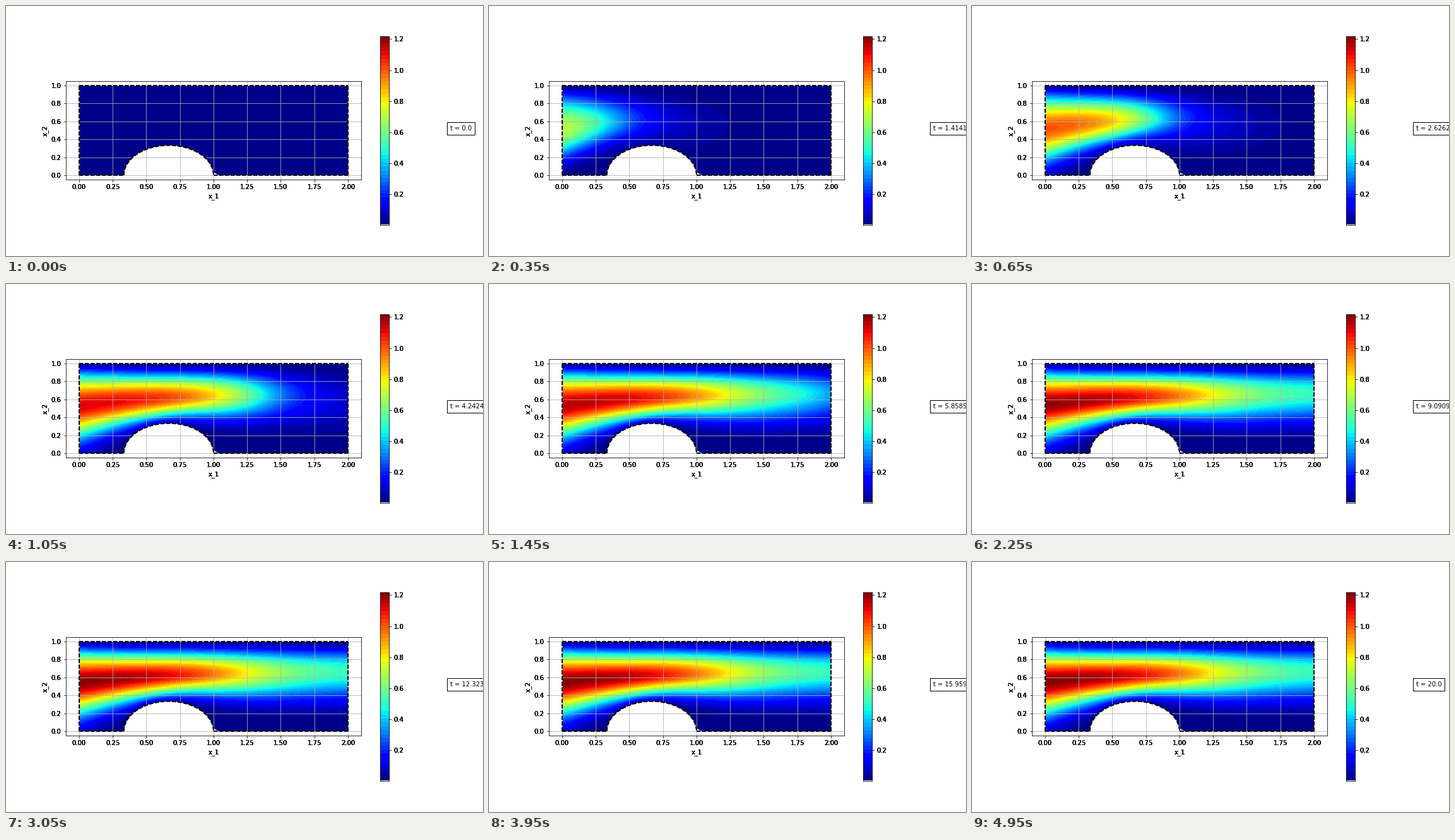
These frames come from a looping animation (756x396 px, 5000 ms). A matplotlib script:

```python
import numpy as np
import matplotlib.pyplot as plt
from matplotlib.animation import FuncAnimation
from matplotlib.patches import Polygon

FRAMES, T_END = 100, 20.0
R, CX = 1 / 3, 2 / 3              # hump radius and centre
V_MIN, V_MAX, BANDS = 0.002, 1.22, 49

plt.rcParams.update({"font.family": "DejaVu Sans", "font.size": 10})
fig = plt.figure(figsize=(10.5, 5.5), dpi=72, facecolor="white")
width = 0.62
height = width * 10.5 / 5.5 / 3
ax = fig.add_axes([0.125, 0.5025 - height / 2, width, height])
cax = fig.add_axes([0.78375, 0.125, 0.755 * 5.5 / 20 / 10.5, 0.755])

colors = plt.get_cmap("jet")((np.arange(BANDS) + 0.5) / BANDS)
x, y = np.meshgrid((np.arange(852) + 0.5) / 426, (np.arange(284) + 0.5) / 284)


def step(u):
    return 1 / (1 + np.exp(np.clip(u, -50, 50)))


# Parts of the plume that do not depend on time
core = 0.475 + 0.75 * step((x - 1.17) / 0.28)
axis_y = 0.545 + 0.14 * (1 - np.exp(-x))
low_w = (0.18 + 0.16 * np.exp(-(x / 0.4) ** 1.3)
         + 0.11 * (1 - np.exp(-(np.maximum(x - 0.65, 0) / 0.6) ** 2)))
high_w = 0.25 + 0.1 * np.exp(-x / 0.4)
gap = np.maximum(np.hypot(x - CX, y) - R, 0)
walls = np.tanh((1 - y) / 0.11) * np.tanh((gap + 0.02) / 0.06)
haze = 0.1 * np.exp(-((y - 0.55) / 0.3) ** 2) * np.tanh((1 - y) / 0.05)
near_inlet = np.exp(-x / 0.3)


def field(t):
    """Concentration: a plume behind a front that travels to the right."""
    growth = 1 - np.exp(-(t / 1.186) ** 0.75)
    early = np.exp(-t / 3.5) * near_inlet
    d = y - axis_y + 0.08 * early
    w = np.where(d < 0, low_w, high_w + 0.08 * early)
    plume = growth * core * np.exp(-(d / w) ** 2) * walls
    front = 0.395 * t - 0.22
    behind = step((x - front + 1.2 * (y - 0.68) ** 2) / 0.17)
    ahead = haze * (1 - np.exp(-t)) * step((x - front - 0.75) / 0.2)
    return plume * behind + ahead * (1 - behind)


def shade(values):
    band = (values - V_MIN) / (V_MAX - V_MIN) * BANDS
    return colors[np.clip(band, 0, BANDS - 1).astype(int)]


def heavy(text, times=5):
    """Draw a text several times over itself so its edges harden."""
    draw = text.draw

    def repeat(renderer):
        for _ in range(times):
            draw(renderer)

    text.draw = repeat


# Domain: a channel with a hump and a small notch at its right foot
theta = np.linspace(np.pi, 0.1, 60)
arc = np.column_stack([CX + R * np.cos(theta), R * np.sin(theta)])
outline = np.vstack([[(0, 0)], arc, [(1.04, 0), (2, 0), (2, 1), (0, 1)]])
domain = Polygon(outline, transform=ax.transData)

image = ax.imshow(shade(field(0.0)), extent=(0, 2, 0, 1), origin="lower",
                  aspect="auto", interpolation="nearest")
image.set_clip_path(domain)

theta = np.linspace(np.pi, 0, 80)
edges = [([0, 0], [0, 1]), ([0, 2], [1, 1]), ([2, 2], [0, 1]),
         ([0, CX - R], [0, 0]), ([CX + R, 2], [0, 0]),
         (CX + R * np.cos(theta), R * np.sin(theta))]
for ex, ey in edges:
    ax.plot(ex, ey, color="black", lw=2, dashes=(3.2, 1.3))

ax.set_xlim(-0.1, 2.1)
ax.set_ylim(-0.05, 1.05)
ax.set_xticks(np.arange(9) * 0.25, [f"{v:.2f}" for v in np.arange(9) * 0.25])
ax.set_yticks(np.arange(6) * 0.2, [f"{v:.1f}" for v in np.arange(6) * 0.2])
ax.set_xlabel("x_1")
ax.set_ylabel("x_2")
ax.grid(True, color="#b0b0b0", lw=0.8)

cax.imshow(colors[:, None, :], extent=(0, 1, V_MIN, V_MAX), origin="lower",
           aspect="auto", interpolation="nearest")
cax.set_xticks([])
cax.yaxis.tick_right()
cax.set_yticks(np.arange(1, 7) * 0.2, [f"{v:.1f}" for v in np.arange(1, 7) * 0.2])

for label in (ax.get_xticklabels() + ax.get_yticklabels() + cax.get_yticklabels()
              + [ax.xaxis.label, ax.yaxis.label]):
    heavy(label)

clock = ax.text(1.3, 0.5, "t = 0.0", transform=ax.transAxes,
                bbox={"facecolor": "white", "edgecolor": "black", "pad": 5})


def update(i):
    t = T_END * i / (FRAMES - 1)
    image.set_data(shade(field(t)))
    clock.set_text(f"t = {t}")
    return image, clock


anim = FuncAnimation(fig, update, frames=FRAMES, interval=50, repeat=True,
                     repeat_delay=0, blit=False)
plt.show()
```
